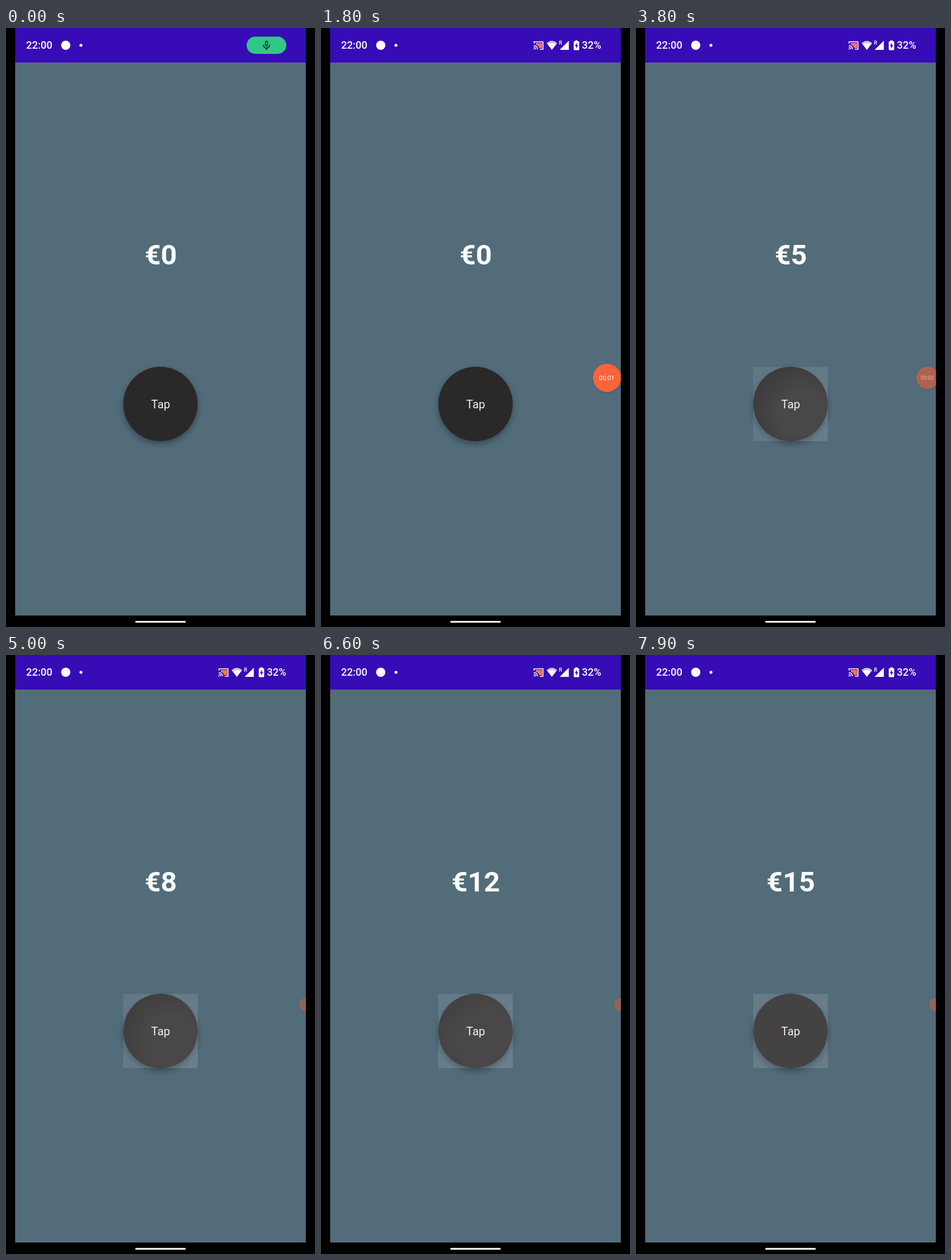
Animation, 538 px wide and 1041 px high, one loop 8000 ms. Source, as an HTML page with a canvas:

```html
<!DOCTYPE html>
<html lang="en">
<head>
<meta charset="utf-8">
<title>Tap counter</title>
<style>
  html, body { margin: 0; width: 538px; height: 1041px; overflow: hidden; background: #000; }
  canvas { display: block; }
</style>
</head>
<body>
<canvas id="stage" width="538" height="1041"></canvas>
<script>
const ctx = document.getElementById('stage').getContext('2d');
const LOOP = 8000, STEP = 100;
const FIRST_TAP = 2100, TAP_PERIOD = 390, RELEASE = 100;
const BAR = '#370bb6', BACK = '#526c7a', ORANGE = '#ff6339';

const clamp = x => Math.max(0, Math.min(1, x));
const ramp = (t, from, to) => clamp((t - from) / (to - from));
const smooth = x => x * x * (3 - 2 * x);
const mix = (a, b, k) => a + (b - a) * k;

function rect(x, y, w, h, color) {
  ctx.fillStyle = color;
  ctx.fillRect(x, y, w, h);
}

function round(x, y, w, h, r, color) {
  ctx.fillStyle = color;
  ctx.beginPath();
  ctx.roundRect(x, y, w, h, r);
  ctx.fill();
}

function disc(x, y, r, color) {
  ctx.fillStyle = color;
  ctx.beginPath();
  ctx.arc(x, y, r, 0, Math.PI * 2);
  ctx.fill();
}

function shape(path, color) {
  ctx.fillStyle = color;
  ctx.fill(new Path2D(path));
}

function line(path, color, width) {
  ctx.strokeStyle = color;
  ctx.lineWidth = width;
  ctx.stroke(new Path2D(path));
}

function label(text, x, y, size, weight, color = '#fff', align = 'center') {
  ctx.font = `${weight} ${size}px Roboto, sans-serif`;
  ctx.textAlign = align;
  ctx.fillStyle = color;
  ctx.fillText(text, x, y);
}

function withAlpha(alpha, draw) {
  if (alpha <= 0) return;
  ctx.save();
  ctx.globalAlpha = alpha;
  draw();
  ctx.restore();
}

function shadow(color, blur, y) {
  ctx.shadowColor = color;
  ctx.shadowBlur = blur;
  ctx.shadowOffsetY = y;
}

function micPill() {
  round(419, 15, 69, 30, 15, '#31c887');
  line('M453.5 24.5v4.5', '#102b20', 5.2);
  ctx.lineCap = 'round';
  line('M453.5 24.5v5', '#102b20', 5.2);
  line('M453.5 24.5v5', '#31c887', 2);
  line('M448 29.5a5.5 5.5 0 0 0 11 0M453.5 35v3', '#102b20', 1.6);
}

function statusIcons() {
  // screen cast
  shape('M374 26h11v9h-5a9 9 0 0 0-6-6z', '#ff7355');
  line('M371 27v-3h15.5v13h-5.5', '#fff', 1.6);
  line('M370.5 30.5a6.5 6.5 0 0 1 6.5 6.5M370.5 33.5a3.5 3.5 0 0 1 3.5 3.5', '#fff', 1.5);
  shape('M370.3 35.2a2 2 0 0 1 2 2h-2z', '#fff');
  // wifi, signal
  shape('M402 38L393 26.5Q402 18.5 411 26.5z', '#fff');
  line('M394.8 27.4Q402 21.6 409.2 27.4', BAR, 0.7);
  label('R', 417, 29, 9, 500);
  shape('M431.5 22v16h-16z', '#fff');
  // charging battery
  round(442.5, 21.5, 4.5, 3, 0.5, '#fff');
  round(440, 23, 9.5, 15.5, 1.5, '#fff');
  shape('M445.6 25.5l-3.6 6h2.2v4.5l3.6-6.3h-2.2z', BAR);
  label('32%', 488, 36, 18, 500, '#fff', 'right');
}

function statusBar(t) {
  rect(16, 0, 506, 60, BAR);
  label('22:00', 35, 36, 18, 500, '#fff', 'left');
  disc(104, 30, 8, '#fff');
  disc(130.5, 30, 2.6, '#fff');
  withAlpha(1 - ramp(t, 500, 800), micPill);
  withAlpha(ramp(t, 600, 900), statusIcons);
}

function ripple(age) {
  const alpha = 0.07 * ramp(age, -30, 60) * (1 - ramp(age, 280, 450));
  if (age < 0 || alpha <= 0) return;
  const r = 24 + age * 0.38;
  const light = ctx.createRadialGradient(288, 669, r * 0.5, 288, 669, r * 1.25);
  light.addColorStop(0, `rgba(255,255,255,${alpha})`);
  light.addColorStop(1, 'rgba(255,255,255,0)');
  rect(204, 589, 130, 129, light);
}

function button(t) {
  ctx.save();
  shadow('rgba(0,0,0,.32)', 11, 5);
  disc(269, 653.5, 64.8, '#2b282a');
  ctx.restore();

  const sinceTap = t - FIRST_TAP;
  if (sinceTap >= 0) {
    rect(204, 589, 130, 129, `rgba(255,255,255,${0.08 * ramp(sinceTap, -100, 200)})`);
    const age = sinceTap % TAP_PERIOD;
    ripple(age);
    if (sinceTap >= TAP_PERIOD) ripple(age + TAP_PERIOD);
  }
  label('Tap', 269.3, 661, 20, 400, '#f0f0f0');
}

function bubble(t) {
  const enter = smooth(ramp(t, 500, 900));
  const dim = smooth(ramp(t, 2300, 2600));
  const hide = smooth(ramp(t, 4300, 4600));
  const x = mix(mix(498, 507.5, dim), 522.5, hide);
  const r = mix(mix(24.5, 19.5, dim), 12, hide) * enter;
  const alpha = mix(mix(1, 0.57, dim), 0.39, hide) * enter;
  const seconds = Math.max(0, Math.floor((t - 700) / 1000));
  withAlpha(alpha, () => {
    ctx.beginPath();
    ctx.rect(16, 60, 506.5, 961);
    ctx.clip();
    ctx.save();
    shadow('rgba(0,0,0,.2)', 3, 1);
    disc(x, 608, r, ORANGE);
    ctx.restore();
    ctx.globalAlpha *= 1 - hide;
    label('00:0' + seconds, x - 0.5, 608 + r * 0.16, r * 0.45, 400);
  });
}

function draw(t) {
  const taps = Math.max(0, Math.floor((t - FIRST_TAP - RELEASE) / TAP_PERIOD) + 1);
  rect(0, 0, 538, 1041, '#000');
  rect(16, 60, 506, 961, BACK);
  statusBar(t);
  label('€' + taps, 269.5, 411, 49, 700);
  button(t);
  bubble(t);
  round(225, 1030.5, 88, 3, 1.5, '#fff');
}

function tick() {
  const t = performance.now() % LOOP;
  draw(Math.floor(t / STEP) * STEP);
  requestAnimationFrame(tick);
}
tick();
</script>
</body>
</html>
```
